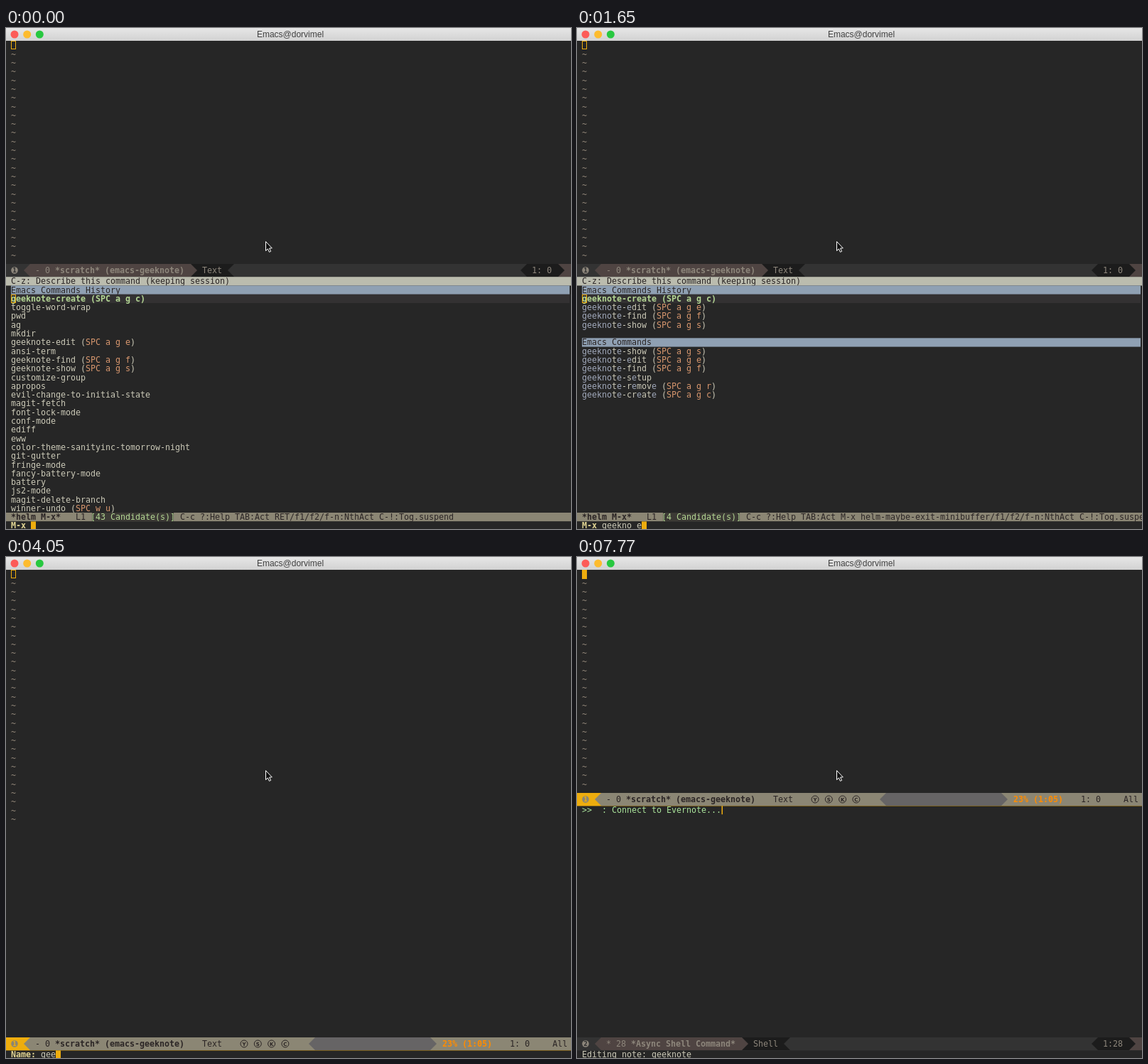
An HTML page with a canvas for the animation above (8000 ms loop, 795 by 705 pixels).

```html
<!DOCTYPE html>
<html lang="en">
<head>
<meta charset="utf-8">
<title>Editor session</title>
<style>
html, body { margin: 0; width: 100%; height: 100%; overflow: hidden; background: #262626; }
canvas { display: block; }
</style>
</head>
<body>
<canvas id="stage" width="795" height="705"></canvas>
<script>
const ctx = document.getElementById('stage').getContext('2d');
const LOOP = 8000, CHAR = 7, LINE = 12.3, LEFT = 7, TOP = 18.4, LOWER = 350.2, MINI = 694.4;
const FONT = '11.63px "DejaVu Sans Mono", monospace';
const C = {
  bg: '#262626', text: '#cbc9b7', green: '#b4d794', shell: '#a9e39a', orange: '#d8976e',
  match: '#a0a8ba', header: '#8fa0b3', help: '#bbbcae', select: '#333132', yellow: '#eead0e',
  prompt: '#e3d694', tilde: '#93887a', bar: '#8b8674', ink: '#2b2525', grey: '#666465',
  idle: '#333333', brown: '#4f4442', dark: '#1c1c1c', dim: '#8d867b', battery: '#ff8c00'
};

const history = `geeknote-create (SPC a g c)
toggle-word-wrap
pwd
ag
mkdir
geeknote-edit (SPC a g e)
ansi-term
geeknote-find (SPC a g f)
geeknote-show (SPC a g s)
customize-group
apropos
evil-change-to-initial-state
magit-fetch
font-lock-mode
conf-mode
ediff
eww
color-theme-sanityinc-tomorrow-night
git-gutter
fringe-mode
fancy-battery-mode
battery
js2-mode
magit-delete-branch
winner-undo (SPC w u)`.split('\n');

const broadCommands = `geeknote-show (SPC a g s)
geeknote-setup
View-scroll-half-page-backward
View-scroll-page-forward-set-page-size
View-search-last-regexp-forward
ad-deactivate-regexp
ahs-chrange-display
configuration-layer//install-packages
customize-changed-options
diff-add-change-log-entries-other-window
dired-do-copy-regexp
dired-do-query-replace-regexp
diredp-image-dired-display-thumbs-recursive
diredp-mark-files-tagged-all
diredp-mark-files-tagged-none
diredp-mark-files-tagged-not-all
diredp-unmark-files-tagged-not-all`.split('\n');

const noteCommands = `geeknote-show (SPC a g s)
geeknote-edit (SPC a g e)
geeknote-find (SPC a g f)
geeknote-setup
geeknote-remove (SPC a g r)
geeknote-create (SPC a g c)`.split('\n');

function rect(x, y, w, h, color) {
  ctx.fillStyle = color;
  ctx.fillRect(x, y, w, h);
}

function text(str, x, y, color, bold) {
  ctx.font = (bold ? 'bold ' : '') + FONT;
  ctx.fillStyle = color;
  ctx.fillText(str, x, y + 10);
}

function disc(x, y, r, color) {
  ctx.fillStyle = color;
  ctx.beginPath();
  ctx.arc(x, y, r, 0, 7);
  ctx.fill();
}

function poly(points, fill, stroke) {
  ctx.beginPath();
  for (let i = 0; i < points.length; i += 2) ctx.lineTo(points[i], points[i + 1]);
  ctx.closePath();
  ctx.fillStyle = fill;
  ctx.fill();
  if (stroke) {
    ctx.strokeStyle = stroke;
    ctx.lineWidth = 1;
    ctx.stroke();
  }
}

function hollowCursor(y) {
  ctx.strokeStyle = C.yellow;
  ctx.lineWidth = 1;
  ctx.strokeRect(LEFT + .5, Math.round(y) + .5, 6, 11);
}

// Band of a mode line; a pointed end reaches 9px outwards
function band(x0, x1, y, color, pointLeft, pointRight) {
  const mid = y + 9, end = y + 18;
  poly([x0, y, x1, y, x1 + (pointRight ? 9 : 0), mid, x1, end, x0, end, x0 - (pointLeft ? 9 : 0), mid], color);
}

function letter(ch, x, y, size, color) {
  ctx.font = `bold ${size}px "DejaVu Sans", sans-serif`;
  ctx.textAlign = 'center';
  ctx.fillStyle = color;
  ctx.fillText(ch, x, y + size * .365);
  ctx.textAlign = 'left';
}

function badge(num, y, color, back) {
  disc(12, y + 9, 4.8, color);
  letter(num, 12, y + 9, 8, back);
}

function activeLine(y) {
  rect(0, y, 795, 18.4, C.yellow);
  band(34, 795, y, C.bar, true);
  band(435, 597, y, C.grey, true, true);
  badge('1', y, C.bar, C.yellow);
  const ty = y - .2 + 3;
  text('- 0', 41, ty, C.ink);
  text('*scratch* (emacs-geeknote)', 69, ty, C.ink, true);
  text('Text', 276, ty, C.ink);
  [...'YSKC'].forEach((ch, i) => {
    const x = 335 + i * 19.3;
    ctx.strokeStyle = C.ink;
    ctx.lineWidth = 1;
    ctx.beginPath();
    ctx.arc(x, y + 9, 5, 0, 7);
    ctx.stroke();
    letter(ch, x, y + 9, 7, C.ink);
  });
  text('23% (1:05)', 614, ty, C.battery, true);
  text('1: 0', 709, ty, C.ink);
  text('All', 769, ty, C.ink);
}

function idleLine(y, num, size, name, mode, pos) {
  const nameX = 41 + size.length * CHAR + CHAR;
  const nameEnd = nameX + name.length * CHAR;
  const modeX = nameEnd + 25, modeEnd = modeX + mode.length * CHAR;
  const ty = y + 2.8;
  rect(0, y, 795, 18.4, C.idle);
  band(nameEnd, modeEnd + 17, y, C.dark);
  band(34, nameEnd + 9, y, C.brown, true, true);
  band(modeEnd + 17, 733, y, C.idle, true);
  rect(770, y, 25, 18, C.brown);
  band(733, 777, y, C.dark, true, true);
  badge(num, y, C.dim, C.idle);
  text(size, 41, ty, C.dim);
  text(name, nameX, ty, C.dim, true);
  text(mode, modeX, ty, C.dim);
  text(pos, 740, ty, C.dim);
}

function candidate(str, y, words) {
  const parts = str.split(new RegExp(`(${['SPC[^)]*', ...words].join('|')})`));
  let x = LEFT;
  parts.forEach((part, i) => {
    const color = i % 2 ? (part.startsWith('SPC') ? C.orange : C.match) : C.text;
    text(part, x, y, color);
    x += part.length * CHAR;
  });
}

function header(str, y) {
  rect(LEFT, y, 786, LINE, C.header);
  text(str, LEFT, y, C.ink);
}

function prompt(label, input) {
  text(label, LEFT, MINI, C.prompt, true);
  const x = LEFT + (label.length + 1) * CHAR;
  text(input, x, MINI, C.text);
  rect(x + input.length * CHAR, MINI, CHAR, 11, C.yellow);
}

function helm(query) {
  const words = query.split(' ').filter(Boolean);
  const fits = str => words.every(w => str.split(' ')[0].includes(w));
  const recent = history.filter(fits);
  const rowY = r => LOWER + r * LINE;

  rect(0, LOWER, 795, LINE, C.help);
  text('C-z: Describe this command (keeping session)', LEFT, LOWER, C.ink);
  header('Emacs Commands History', rowY(1));
  rect(LEFT, rowY(2), 786, LINE, C.select);
  recent.forEach((str, i) => {
    if (i) candidate(str, rowY(2 + i), words);
    else text(str, LEFT, rowY(2), C.green, true);
  });
  hollowCursor(rowY(2));
  if (query) {
    const start = recent.length + 3;
    header('Emacs Commands', rowY(start));
    const commands = query.length < 3 ? broadCommands : noteCommands.filter(fits);
    commands.forEach((str, i) => candidate(str, rowY(start + 1 + i), words));
  }

  const y = 682;
  const count = `[${query ? recent.length : 43} Candidate(s)]`;
  const width = count.length * CHAR;
  const action = query ? 'M-x helm-maybe-exit-minibuffer' : 'RET';
  rect(0, y, 795, 12.4, C.bar);
  text('*helm M-x*', LEFT, y, C.ink, true);
  text('L1', 98, y, C.ink);
  rect(121, y, width - 4, 12.4, '#3c3a35');
  text(count, 119, y, C.green);
  text(`C-c ?:Help TAB:Act ${action}/f1/f2/f-n:NthAct C-!:Tog.suspend`, 126 + width, y, C.ink);
  rect(0, MINI, 795, 11, C.bg);
  prompt('M-x', query);
}

function shell(t) {
  const ready = t >= 5990;
  idleLine(676, '2', ready ? '* 28' : '* 0', '*Async Shell Command*', 'Shell', ready ? '1:28' : '1: 0');
  text('Editing note: geeknote', LEFT, MINI, C.text);
  if (!ready) return rect(LEFT, LOWER, 1.5, 12, C.yellow);
  // Arrows appear one by one, then vanish one by one
  const step = Math.floor((t - 5985) / 297);
  const arrows = ['>> ', '>>>', ' >>', '  >', '   ', '>  '][step % 6];
  text(arrows + ' : Connect to Evernote...', LEFT, LOWER, C.shell);
  rect(203.5, LOWER, 1.5, 12, C.yellow);
}

function titleBar() {
  const shade = ctx.createLinearGradient(0, 0, 0, 18);
  shade.addColorStop(0, '#e6e6e6');
  shade.addColorStop(1, '#d2d2d2');
  rect(0, 0, 795, 18, shade);
  disc(12, 9, 5.5, '#fc5b57');
  disc(29.7, 9, 5.5, '#fdbc2e');
  disc(47.3, 9, 5.5, '#28c840');
  ctx.font = '12px "Liberation Sans", Arial, sans-serif';
  ctx.textAlign = 'center';
  ctx.fillStyle = '#404040';
  ctx.fillText('Emacs@dorvimel', 400, 13);
  ctx.textAlign = 'left';
}

function arrowPointer() {
  poly([365.5, 300.5, 365.5, 313.5, 368.4, 310.8, 370.4, 315.3, 372.6, 314.3,
    370.6, 310, 374.3, 309.8], '#111', '#fff');
}

function beamPointer() {
  const beam = new Path2D('M362.5 296.5h2l1.5 1.5 1.5-1.5h2M366 298v10M362.5 309.5h2l1.5-1.5 1.5 1.5h2M364 303h4');
  ctx.strokeStyle = '#a0a0a0';
  ctx.lineWidth = 2;
  ctx.stroke(beam);
  ctx.strokeStyle = '#151515';
  ctx.lineWidth = 1;
  ctx.stroke(beam);
}

function draw(t) {
  const naming = t >= 2400 && t < 5690;
  rect(0, 0, 795, 705, C.bg);
  for (let r = 1; r <= (naming ? 28 : 24); r++) text('~', LEFT, TOP + r * LINE, C.tilde);
  if (!naming) rect(0, 332, 795, 373, C.bg);
  if (t >= 5990) rect(LEFT, 18, CHAR, 13, C.yellow);
  else hollowCursor(TOP);

  if (t < 2400) {
    const query = t < 600 ? ''
      : t < 1500 ? 'geekno'.slice(0, 2 + Math.floor((t - 600) / 150))
      : 'geekno edi'.slice(0, 7 + Math.floor((t - 1500) / 150));
    idleLine(332, '1', '- 0', '*scratch* (emacs-geeknote)', 'Text', '1: 0');
    helm(query);
  } else if (naming) {
    const step = Math.max(0, Math.min(6, Math.floor((t - 3900) / 148) + 1));
    activeLine(676);
    prompt('Name:', 'geeknote'.slice(0, Math.round(step * 8 / 6)));
  } else {
    activeLine(332);
    shell(t);
  }
  titleBar();
  if (t >= 5540 && t < 5690) beamPointer();
  else arrowPointer();
}

const begin = performance.now();
function frame() {
  draw((performance.now() - begin) % LOOP);
  requestAnimationFrame(frame);
}
frame();
</script>
</body>
</html>
```
